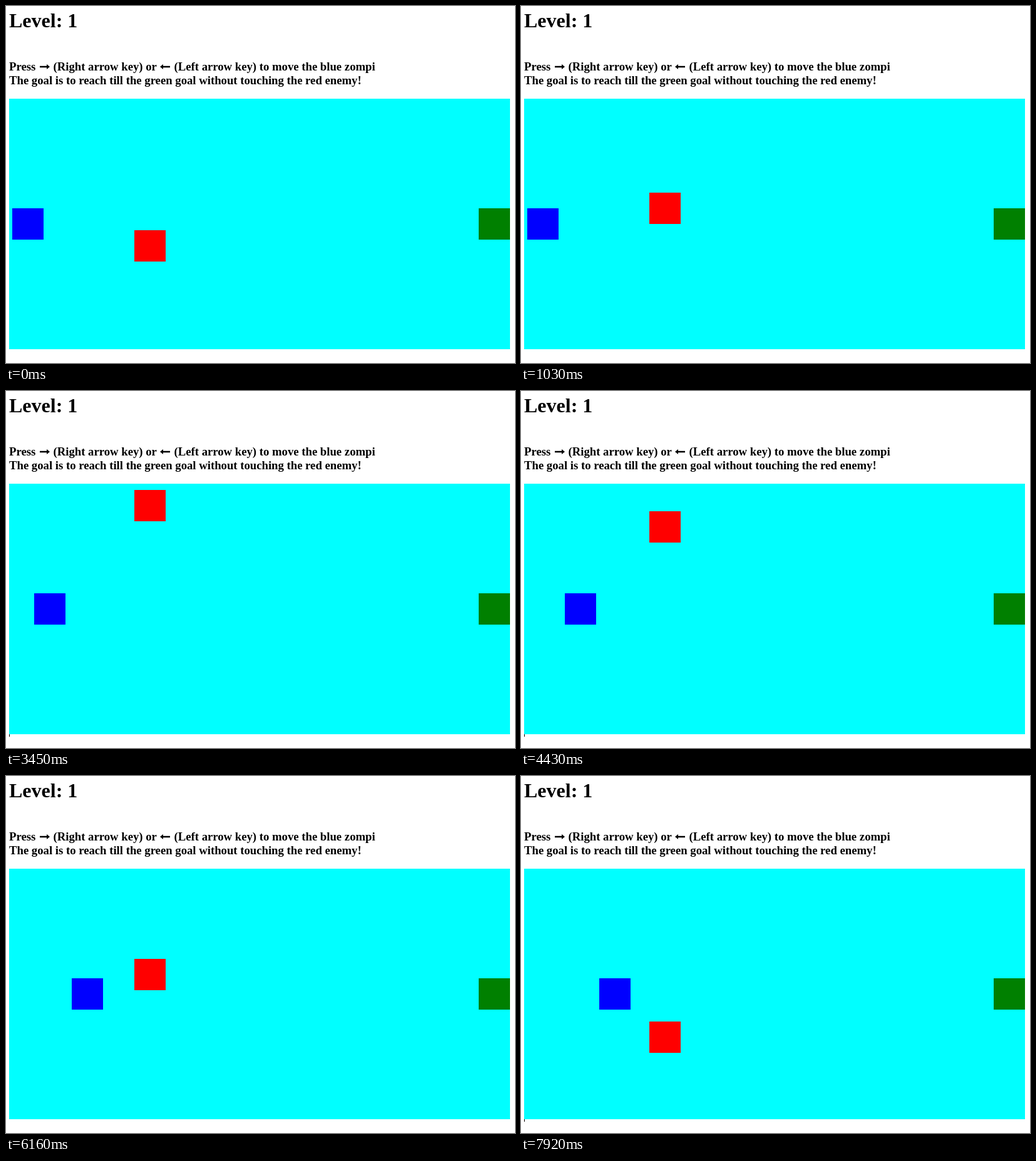
These frames come from a looping animation (813 px wide and 570 px high, 7.99 s). An HTML page with a canvas:

```html
<!DOCTYPE html>
<html lang="en">
<head>
<meta charset="utf-8">
<title>Level game</title>
<style>
  html, body { margin: 0; width: 100%; height: 100%; overflow: hidden; background: #fff; }
  canvas { display: block; }
</style>
</head>
<body>
<canvas id="stage" width="813" height="570"></canvas>
<script>
const ctx = document.getElementById('stage').getContext('2d');
const LOOP = 7990;
const TICK = 69.4;
const LAST = 114;
const FIELD = { x: 5, y: 148, w: 800, h: 400 };
const SIZE = 50;

const tickAt = t => Math.min(LAST, Math.floor((t + 20) / TICK));

// The enemy rises 4 px per tick, touches the top of the field and falls again.
const enemyY = n => Math.max(FIELD.y, 358 - 4 * n, 4 * n - 64);

// The player moves in 5 px key presses, with changing pace: [tick, x].
const PACE = [[24, 10], [50, 45], [79, 100], [LAST, 125]];

function playerX(n) {
  let x = PACE[0][1];
  for (let i = 1; i < PACE.length; i++) {
    const [n0, x0] = PACE[i - 1], [n1, x1] = PACE[i];
    const part = Math.min(1, Math.max(0, (n - n0) / (n1 - n0)));
    x += (x1 - x0) * part;
  }
  return Math.round(x / 5) * 5;
}

function box(color, x, y, w = SIZE, h = SIZE) {
  ctx.fillStyle = color;
  ctx.fillRect(x, y, w, h);
}

function text(str, x, y, size = 18.72) {
  ctx.font = `bold ${size}px "Liberation Serif", "Times New Roman", serif`;
  ctx.fillText(str, x, y);
}

function arrow(tail, dir) {
  const y = 97, tip = tail + 16 * dir, neck = tip - 5 * dir;
  ctx.fillRect(Math.min(tail, neck), y - 1.25, 11, 2.5);
  ctx.beginPath();
  ctx.moveTo(tip, y);
  ctx.lineTo(neck, y - 4);
  ctx.lineTo(neck, y + 4);
  ctx.fill();
}

function drawText() {
  ctx.fillStyle = '#000';
  text('Level: 1', 5, 34, 32);
  text('Press', 5, 103);
  arrow(54, 1);
  text('(Right arrow key) or', 75.5, 103);
  arrow(262, -1);
  text('(Left arrow key) to move the blue zompi', 268.5, 103);
  text('The goal is to reach till the green goal without touching the red enemy!', 5, 125);
}

function draw(t) {
  const n = tickAt(t);
  box('#fff', 0, 0, 813, 570);
  drawText();
  box('#0ff', FIELD.x, FIELD.y, FIELD.w, FIELD.h);
  box('#008000', 755, 323);
  box('#00f', playerX(n), 323);
  box('#f00', 205, enemyY(n));

  // blinking text cursor, first shown after a click
  const blink = t - 1180;
  if (blink >= 0 && blink % 1060 < 530) box('#000', 5, 548, 1, 4);
}

function loop() {
  draw(performance.now() % LOOP);
  requestAnimationFrame(loop);
}
loop();
</script>
</body>
</html>
```
